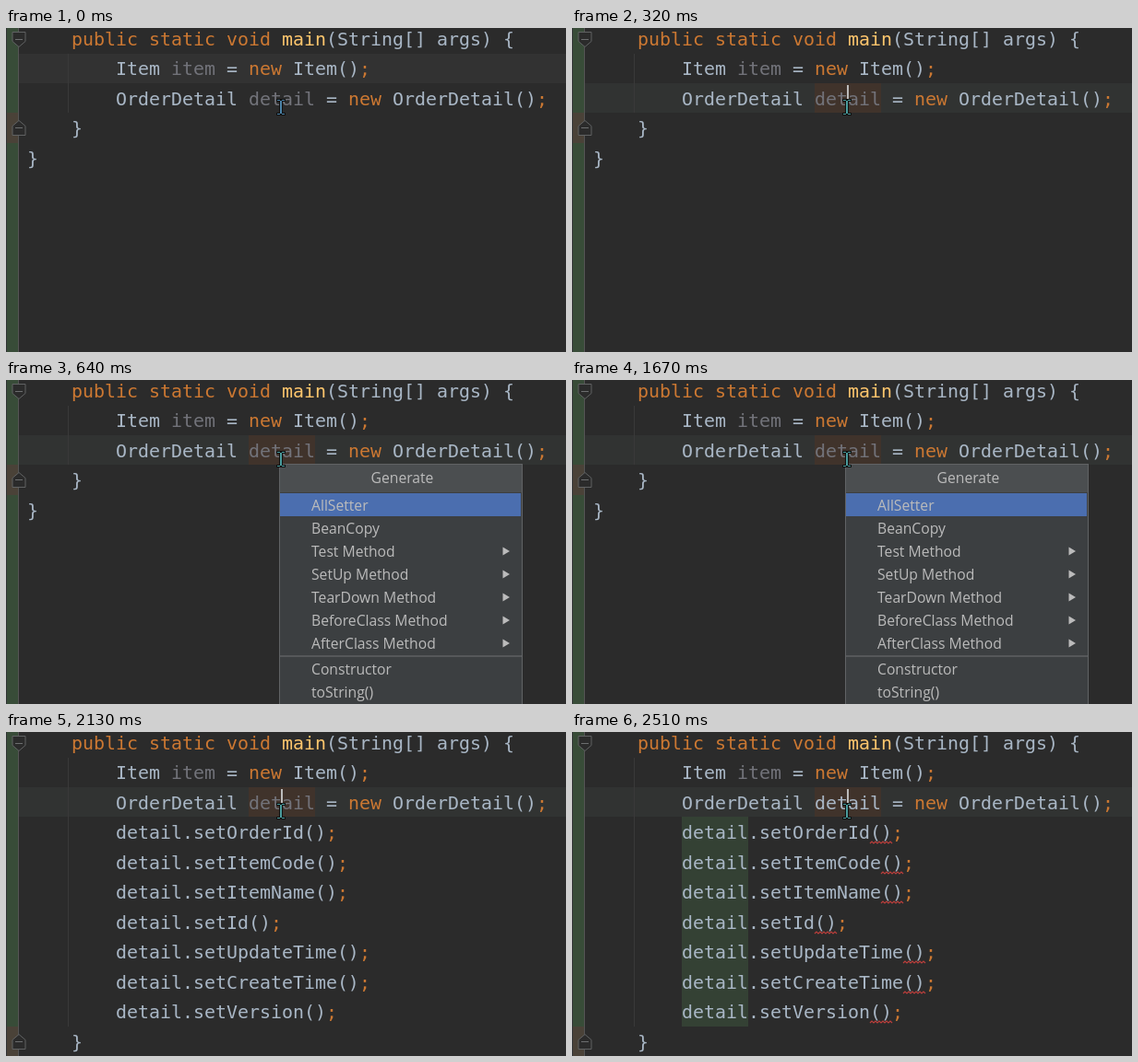
An HTML page with a canvas for the animation above (2.6 s loop, 607 by 352 pixels).

```html
<!DOCTYPE html>
<html lang="en">
<head>
<meta charset="utf-8">
<title>Generate setters</title>
<style>
  html, body { margin: 0; width: 100%; height: 100%; overflow: hidden; background: #2b2b2b; }
  canvas { display: block; }
</style>
</head>
<body>
<canvas width="607" height="352"></canvas>
<script>
const ctx = document.querySelector('canvas').getContext('2d');
const LOOP = 2600, CHAR = 12, LEFT = 23, ROW = 32.45;
const PLAIN = '#a9b7c6', KEYWORD = '#cc7832', METHOD = '#ffc66d', UNUSED = '#72737a';
const SETTERS = ['OrderId', 'ItemCode', 'ItemName', 'Id', 'UpdateTime', 'CreateTime', 'Version'];
const MENU = ['AllSetter', 'BeanCopy', 'Test Method', 'SetUp Method', 'TearDown Method',
  'BeforeClass Method', 'AfterClass Method', 'Constructor', 'toString()'];

const rowTop = row => Math.floor(ROW * row - 4.4);
const colX = col => LEFT + col * CHAR;

function rect(color, x, y, w, h) {
  ctx.fillStyle = color;
  ctx.fillRect(x, y, w, h);
}

function polygon(...points) {
  ctx.beginPath();
  points.forEach(([x, y]) => ctx.lineTo(x, y));
  ctx.closePath();
}

// Writes alternating text and colour arguments from a grid position.
function code(row, col, ...parts) {
  ctx.font = '19.93px "DejaVu Sans Mono", monospace';
  ctx.textAlign = 'left';
  for (let i = 0; i < parts.length; i += 2) {
    ctx.fillStyle = parts[i + 1];
    ctx.fillText(parts[i], colX(col), Math.round(19 + ROW * row));
    col += parts[i].length;
  }
}

function markWord(color, row, col, length) {
  rect(color, colX(col), rowTop(row), length * CHAR, rowTop(row + 1) - rowTop(row));
}

function squiggle(row, col) {
  const x = colX(col), y = rowTop(row) + 28;
  ctx.beginPath();
  for (let i = 0; i <= 12; i++) ctx.lineTo(x + i * 2, y + (i % 2 ? -1 : 1));
  ctx.strokeStyle = '#bc3f3c';
  ctx.lineWidth = 1.2;
  ctx.stroke();
}

function foldIcon(y, dir) {
  polygon([7, y - 8 * dir], [21, y - 8 * dir], [21, y + 2 * dir], [14, y + 8 * dir], [7, y + 2 * dir]);
  ctx.fillStyle = '#2b2b2b';
  ctx.fill();
  ctx.strokeStyle = '#606263';
  ctx.lineWidth = 1;
  ctx.stroke();
  rect('#6c6e6f', 10, Math.floor(y), 8, 1);
}

function gutter(endRow) {
  rect('#313335', 0, 0, 1, 352);
  rect('#384c38', 1, 0, 12, 352);
  rect('#4a4238', 1, rowTop(endRow), 12, rowTop(endRow + 1) - rowTop(endRow));
  rect('#555555', 13, 0, 1, 352);
  foldIcon(12.5, 1);
  foldIcon(rowTop(endRow) + 16.5, -1);
}

function pointer(color) {
  rect('#101010', 293, 77, 10, 3);
  rect('#101010', 293, 92, 10, 3);
  rect('#101010', 296, 78, 4, 15);
  rect(color, 297, 79, 2, 14);
  rect(color, 294, 78, 3, 1);
  rect(color, 299, 78, 3, 1);
  rect(color, 294, 93, 3, 1);
  rect(color, 299, 93, 3, 1);
}

function menu(selected) {
  rect('#616365', 296, 91, 264, 261);
  rect('#3c3f41', 297, 92, 262, 260);
  rect('#4b4e50', 297, 92, 262, 30);
  rect('#4b6eaf', 297, 123 + 25 * selected, 261, 25);
  rect('#56585a', 297, 299, 262, 2);
  ctx.font = '15.7px "Open Sans", sans-serif';
  ctx.fillStyle = '#bbbbbb';
  ctx.textAlign = 'center';
  ctx.fillText('Generate', 429.5, 112);
  ctx.textAlign = 'left';
  MENU.forEach((label, i) => {
    const y = Math.round(135.5 + 25.1 * i + (i > 6 ? 3 : 0));
    ctx.fillStyle = '#bbbbbb';
    ctx.fillText(label, 331, y + 6);
    if (i > 1 && i < 7) {
      polygon([538.5, y - 4.5], [546, y], [538.5, y + 4.5]);
      ctx.fill();
    }
  });
}

function draw(t) {
  const clicked = t >= 80, menuOpen = t >= 640 && t < 2130;
  const inserted = t >= 2130, inspected = t >= 2430, usages = t >= 2510;
  const endRow = inserted ? 10 : 3, caretRow = clicked ? 2 : 1;

  rect('#2b2b2b', 0, 0, 607, 352);
  rect(clicked ? '#313332' : '#323232', 14, rowTop(caretRow), 593, 32);
  gutter(endRow);
  rect('#393939', 67, 28, 1, rowTop(endRow) - 28);
  if (t >= 320) markWord('#40332b', 2, 20, 6);

  code(0, 4, 'public static void ', KEYWORD, 'main', METHOD, '(String[] args) {', PLAIN);
  code(1, 8, 'Item ', PLAIN, 'item', UNUSED, ' = ', PLAIN, 'new ', KEYWORD, 'Item()', PLAIN, ';', KEYWORD);
  code(2, 8, 'OrderDetail ', PLAIN, 'detail', inspected ? PLAIN : UNUSED, ' = ', PLAIN,
    'new ', KEYWORD, 'OrderDetail()', PLAIN, ';', KEYWORD);
  if (inserted) SETTERS.forEach((name, i) => {
    const call = 'detail.set' + name;
    if (usages) markWord('#344134', i + 3, 8, 6);
    code(i + 3, 8, call + '()', PLAIN, ';', KEYWORD);
    if (inspected) squiggle(i + 3, 8 + call.length);
  });
  code(endRow, 4, '}', PLAIN);
  if (!inserted) code(4, 0, '}', PLAIN);

  if (clicked && !menuOpen) rect('#bbbbbb', 298, 62, 2, 29);
  if (menuOpen) menu(t >= 1500 && t < 1670 ? 1 : 0);
  pointer(clicked ? '#4a9c9c' : '#4b83a8');
}

function frame() {
  draw(performance.now() % LOOP);
  requestAnimationFrame(frame);
}
frame();
</script>
</body>
</html>
```
